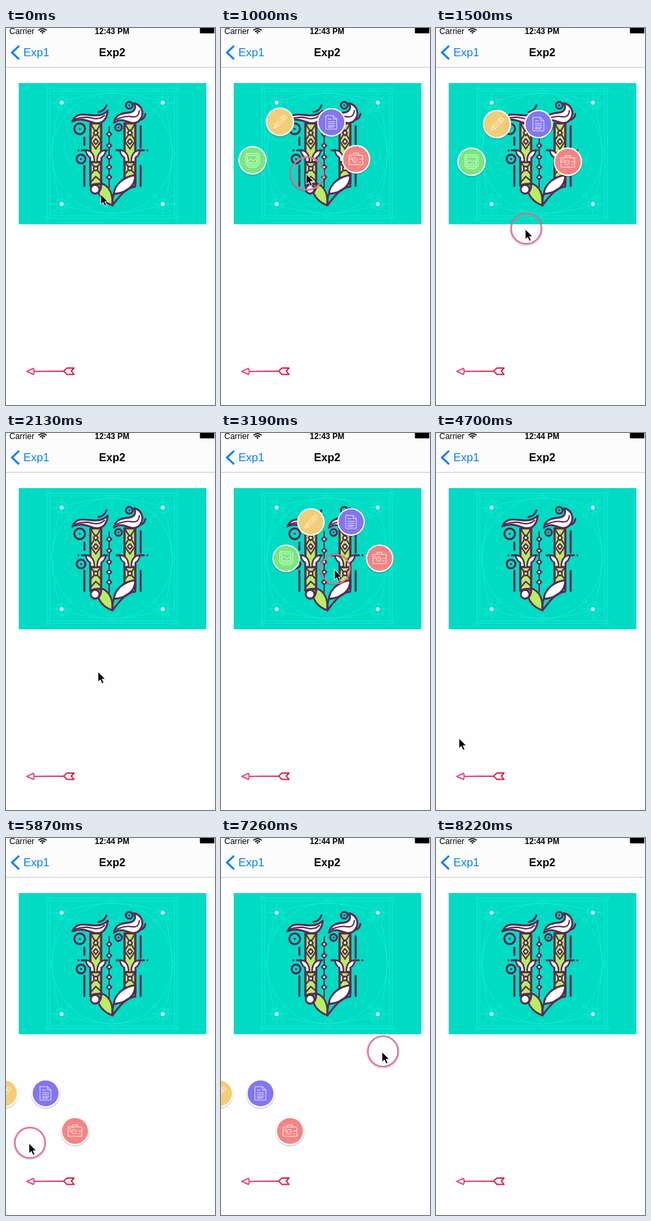
An HTML page that plays this animation: 312x561 px, repeating every 8.77 s.

```html
<!DOCTYPE html>
<html lang="en">
<head>
<meta charset="utf-8">
<title>Radial touch menu</title>
<style>
html, body { margin: 0; width: 100%; height: 100%; overflow: hidden; background: #fefefe; }
svg { display: block; width: 312px; height: 561px; }
text { font-family: "Liberation Sans", Arial, sans-serif; }
.line { fill: none; stroke-linecap: round; stroke-linejoin: round; }
</style>
</head>
<body>
<svg viewBox="0 0 312 561">
  <defs>
    <linearGradient id="pink" gradientUnits="userSpaceOnUse" x1="30" y1="0" x2="102" y2="0">
      <stop offset="0" stop-color="#ee5580"/><stop offset="1" stop-color="#cf2145"/>
    </linearGradient>
    <g id="corner" class="line">
      <path d="M0-97H97V0M0-93H93V0M0-90A90 90 0 0 1 90 0M0-97L5-90L0-84M90-5L95 0L90 5"/>
      <circle cx="97" cy="-97" r="3"/>
      <circle cx="75.5" cy="-75.5" r="8"/>
      <circle cx="63.5" cy="-63.5" r="3"/>
      <path d="M75.5-91V-60M60-75.5H91M65-65L87-87M66-86L85-65M0-90Q60-85 75-75Q85-60 90 0"/>
    </g>
    <path id="wing" d="M-2 13C-2 3-6-4-15-4C-14 2-12 5-8 7V13Z" fill="#fff"/>
    <g id="column">
      <path d="M-8-44H8V45L-8 49Z" fill="#b8ee62"/>
      <path d="M-8-44L8-18M8-44L-8-18M-8-18L0-6L8-18M-8 14L8 32M8 14L-8 32M-8 44L0 35L8 42" stroke-width="2.200"/>
      <path d="M0-34L3.500-30L0-26L-3.500-30ZM0-21L3.500-17L0-13L-3.500-17Z" fill="#fff" stroke-width="2.200"/>
      <path d="M-8-44V49M8-44V45"/>
      <g stroke-width="2.300">
        <use href="#wing"/><use href="#wing" transform="scale(-1 1)"/>
        <path d="M-8 14H8"/>
        <circle cy="23" r="3" fill="#fff"/>
      </g>
    </g>
  </defs>

  <rect width="312" height="58" fill="#fcfcfc"/>
  <path d="M0 58.500H312" stroke="#c9c9cc"/>
  <text x="5" y="8.500" font-size="12.200">Carrier</text>
  <g class="line" stroke="#000" stroke-width="1.600">
    <path d="M49 3Q54.500-1 60 3M51.300 5.300Q54.500 3 57.700 5.300"/>
    <circle cx="54.500" cy="7.300" r=".5"/>
  </g>
  <text id="clock" x="158.300" y="8.500" font-size="11.900" font-weight="bold" text-anchor="middle">12:43 PM</text>
  <rect x="289.500" y="-1" width="21.500" height="9" rx="1"/>
  <path d="M19.500 26.500L9 36.500L19.500 46.500" fill="none" stroke="#087eff" stroke-width="3"/>
  <text x="26" y="42" font-size="17" fill="#087eff">Exp1</text>
  <text x="158.500" y="42" font-size="16.500" font-weight="bold" text-anchor="middle">Exp2</text>

  <rect x="19" y="82" width="280" height="210" fill="#00dbc4"/>
  <g id="pattern" transform="translate(158.500 186.500)" stroke="#12efd8" stroke-width=".8"></g>
  <g fill="#fff">
    <circle cx="83" cy="111" r="2.700"/><circle cx="234" cy="111" r="2.700"/>
    <circle cx="83" cy="262" r="2.700"/><circle cx="234" cy="262" r="2.700"/>
  </g>

  <g class="line" stroke="#5a2850" stroke-width="2.800">
    <use href="#column" x="134" y="186"/>
    <use href="#column" x="185" y="186"/>
    <g fill="#fff">
      <path d="M99 139C105 125 119 129 130 130C140 131 147 128 152 123C150 139 141 145 128 140C117 136 109 135 99 139Z"/>
      <path d="M161 141C164 128 173 127 183 126C192 125 195 119 191 112C202 114 207 126 201 135C195 145 185 141 177 138C171 136 167 137 161 141Z"/>
    </g>
    <path d="M102 136Q116 131 128 134T147 130M165 136Q178 130 188 132T199 123" stroke-width="2"/>
    <path d="M138 125Q147 124 150 115M200 137Q207 135 208 128"/>
    <g stroke-width="3">
      <circle cx="110" cy="150" r="8"/><circle cx="112" cy="195" r="6.500"/>
      <circle cx="184" cy="115" r="5"/><circle cx="168" cy="148" r="5"/>
      <path d="M110 150h.1M112 195h.1M184 115h.1M168 148h.1M108 182h.1M211 182h.1"/>
      <path d="M117 163V174M117 205V235M201 146V178M201 205V235"/>
    </g>
    <path d="M113 182H120M148 182H151M165 182H171M199 182H206"/>
    <path d="M154 147V237" stroke-width="2"/>
    <path id="beads" fill="#fff" stroke-width="2.400"/>
    <path d="M142 231C154 235 160 247 159 264C148 260 141 253 138 245Q143 239 142 231Z" fill="#b8ee62"/>
    <path d="M126 235Q133 230 142 233"/>
    <circle cx="133" cy="240" r="6.500" fill="#fff"/>
    <path d="M193 219C193 235 181 245 161 247C162 233 176 221 193 219Z" fill="#fff"/>
    <path d="M193 219V236C180 237 170 249 159 264Q158 254 161 247"/>
  </g>

  <g class="line" stroke="url(#pink)" stroke-width="2">
    <path d="M31 511L41 506.500Q43 511 41 515.500ZM43 511L86 510.500L91 506H101.500L97.500 510.500L101.500 515.500H91L86 510.500"/>
  </g>

  <g id="menu"></g>
  <g id="ring" fill="none">
    <circle r="23.500" cy=".8" stroke="#000" stroke-opacity=".13" stroke-width="3"/>
    <circle r="22.500" stroke="#e86f8b" stroke-width="2.200"/>
  </g>
  <path id="cursor" d="M-.8 0V15.500L2.800 12.200L5.400 18L8 16.800L5.500 11.200H10.200Z" stroke="#fff" stroke-width="1"/>
</svg>

<script>
const LOOP = 8770;
const byId = id => document.getElementById(id);

byId("pattern").innerHTML = [[1, 1], [-1, 1], [1, -1], [-1, -1]]
  .map(([x, y]) => `<use href="#corner" transform="scale(${x} ${y})"/>`).join("");
byId("beads").setAttribute("d", [158, 175, 192, 207, 222]
  .map(y => `M154 ${y - 3.5}l3.500 3.500l-3.500 3.500l-3.500-3.500Z`).join(""));

// rest: place relative to the touch; swing: extra drift while overshooting
const items = [
  { color: "#78e87c", rest: [-76, -17], swing: [0, -10],
    icon: "M-8-10H8Q10-10 10-8V5Q10 7 8 7H-8Q-10 7-10 5V-8Q-10-10-8-10ZM-7-7H7V4H-7ZM-7 2L-3-3L1 1L4-2L7 1M-8 7L-6 10H6L8 7" },
  { color: "#f2ce78", rest: [-38, -73], swing: [0, 30],
    icon: "M-9 9L-7 3L5-9Q7-10 9-8T9-5L-3 7ZM-7 3L-3 7M3-7L7-3M-5 5L6-6" },
  { color: "#8475f1", rest: [24, -73], swing: [125, 40],
    icon: "M-8-10H3L8-5V10H-8ZM3-10V-5H8M-5-5H0M-5-1H5M-5 2H5M-5 5H5M-5 7H3" },
  { color: "#f38584", rest: [68, -17], swing: [-10, -30],
    icon: "M-10-6H10V8H-10ZM-4-6V-9H4V-6M-10 0H-6M5 0H10M-5 1A3.500 3.500 0 1 0 2 1A3.500 3.500 0 1 0-5 1M-2 1H-1M-8-3H-6M5 4H7" }
];
byId("menu").innerHTML = items.map(({ color, icon }) => `<g>
  <circle r="21.800" cy="1.300" fill-opacity=".16"/><circle r="21.300" fill="#fff"/>
  <circle r="19.300" fill="${color}"/>
  <path class="line" d="${icon}" stroke="#fff" stroke-width="1" stroke-opacity=".8"/></g>`).join("");
const buttons = [...byId("menu").children];

// start, end, x, y
const moves = [
  [20, 100, 128, 217], [1360, 1610, 138, 355], [2370, 2540, 170, 203],
  [3550, 3780, 177, 436], [4560, 4700, 35, 454], [6850, 7020, 233, 325],
  [7260, 7260, 241, 318], [8100, 8220, 271, 528]
];
const touches = [
  { open: 790, close: 1940, end: 2130, x: 129, y: 216 },
  { open: 3110, close: 4080, end: 4270, x: 171, y: 203 },
  { open: 5300, close: 7410, end: 7680, x: 35, y: 453 }
];

const clamp = v => Math.max(0, Math.min(1, v));
const smooth = v => v * v * (3 - 2 * v);
const spring = s => 1 - Math.exp(-10.5 * s) * Math.cos(Math.PI * s / 0.17);
const place = (el, x, y, scale = 1) =>
  el.setAttribute("transform", `translate(${x} ${y}) scale(${scale})`);

function cursorAt(t) {
  let x = 142, y = 247;
  for (const [start, end, toX, toY] of moves) {
    if (t < start) break;
    const p = end > start ? smooth(clamp((t - start) / (end - start))) : 1;
    x += (toX - x) * p;
    y += (toY - y) * p;
  }
  return [x, y];
}

function draw(t) {
  const [x, y] = cursorAt(t);
  const cursor = byId("cursor"), menu = byId("menu"), ring = byId("ring");
  place(cursor, x, y);
  cursor.style.display = t < 8220 ? "" : "none";
  byId("clock").textContent = t < 3300 ? "12:43 PM" : "12:44 PM";

  const touch = touches.find(({ open, end }) => t >= open && t < end);
  menu.style.display = ring.style.display = touch ? "" : "none";
  if (!touch) return;

  const s = spring((t - touch.open) / 1000);
  const over = Math.max(0, s - 1);
  const fade = 1 - clamp((t - touch.close) / (touch.end - touch.close));
  menu.setAttribute("opacity", fade);
  ring.setAttribute("opacity", fade);
  place(ring, x + 0.8, y - 0.5, s);
  items.forEach(({ rest, swing }, i) => place(buttons[i],
    touch.x + rest[0] * s + swing[0] * over,
    touch.y + rest[1] * s + swing[1] * over,
    Math.min(1, s)));
}

const began = performance.now();
function tick() {
  draw((performance.now() - began) % LOOP);
  requestAnimationFrame(tick);
}
tick();
</script>
</body>
</html>
```
